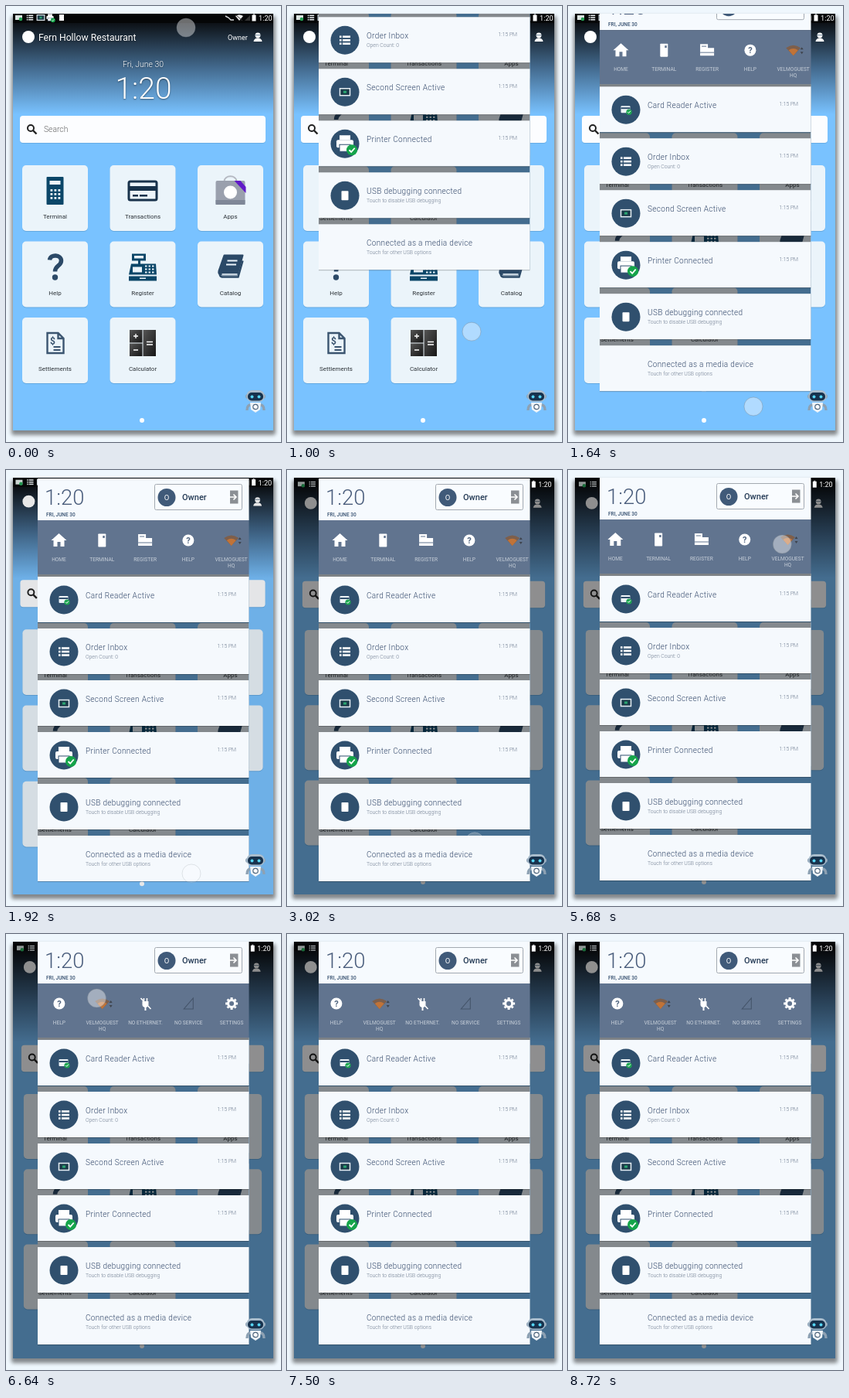
Write an HTML page that moves like this. It is 356x564 px and loops after 8740 ms.

```html
<!DOCTYPE html>
<html lang="en">
<head>
<meta charset="utf-8">
<title>Pull-down panel</title>
<style>
  html, body { margin: 0; width: 100%; height: 100%; overflow: hidden; background: #eff7fd; }
  svg { display: block; width: 356px; height: 564px; font-family: Roboto, sans-serif; }
  .shade { text-shadow: 0 1px 2px rgba(0, 0, 0, .45); }
</style>
</head>
<body>
<svg viewBox="0 0 356 564">
  <defs>
    <linearGradient id="sky" gradientUnits="userSpaceOnUse" x1="0" y1="20" x2="0" y2="140">
      <stop offset="0" stop-color="#0b0e12"/>
      <stop offset=".5" stop-color="#436a8e"/>
      <stop offset="1" stop-color="#79c2ff"/>
    </linearGradient>
    <linearGradient id="calc" x2="1" y2="1">
      <stop offset="0" stop-color="#555"/><stop offset="1" stop-color="#161616"/>
    </linearGradient>
    <filter id="blur" x="-10%" y="-10%" width="120%" height="120%"><feGaussianBlur stdDeviation="2.4"/></filter>
    <clipPath id="screenClip"><path d="M9 10H346V549H9Z"/></clipPath>
    <clipPath id="panelClip"><path d="M41 10H314.500V549H41Z"/></clipPath>
    <clipPath id="gapClip"><path d="M41 134H314.500V531H41Z"/></clipPath>
  </defs>

  <rect x="7" y="13" width="342" height="542" rx="3" opacity=".45" filter="url(#blur)"/>
  <rect x="9" y="10" width="337" height="539" fill="url(#sky)"/>
  <g clip-path="url(#screenClip)">
    <g id="homeView"><g id="home"></g></g>
    <rect id="dim" x="9" y="10" width="337" height="539"/>
  </g>
  <rect x="9" y="10" width="337" height="12" fill="#050607"/>
  <g id="status">
    <g id="statusLeft"></g>
    <g id="statusRight"></g>
  </g>

  <g clip-path="url(#panelClip)">
    <g id="panel">
      <g clip-path="url(#gapClip)">
        <rect x="41" y="134" width="274" height="397" fill="#79c2ff"/>
        <use href="#home" transform="translate(0 -12) scale(1 1.015)"/>
        <rect x="41" y="134" width="274" height="397" opacity=".44"/>
        <circle id="ghost" cx="243" cy="480" r="12" fill="#8ba0b0" stroke="#b5c2cb"/>
      </g>
      <g id="rows"></g>
      <g id="header"></g>
      <rect x="41" y="64" width="274" height="70" fill="#61748f"/>
      <rect x="41" y="134" width="274" height="3" fill="#7d8286"/>
      <g id="strip"></g>
    </g>
  </g>
  <g id="robot"></g>
  <circle id="touch" r="12" fill="#fff" fill-opacity=".42" stroke="#77808a" stroke-opacity=".4"/>
</svg>
<script>
const LOOP = 8740;
const NAVY = '#30506e';
const byId = id => document.getElementById(id);
const rect = (x, y, w, h, fill, extra = '') =>
  `<rect x="${x}" y="${y}" width="${w}" height="${h}" fill="${fill}" ${extra}/>`;
const circle = (x, y, r, fill, extra = '') => `<circle cx="${x}" cy="${y}" r="${r}" fill="${fill}" ${extra}/>`;
const path = (d, fill, extra = '') => `<path d="${d}" fill="${fill}" ${extra}/>`;
const line = (d, color, width = 1, extra = '') => path(d, 'none', `stroke="${color}" stroke-width="${width}" ${extra}`);
const text = (x, y, size, fill, label, extra = '') =>
  `<text x="${x}" y="${y}" font-size="${size}" fill="${fill}" ${extra}>${label}</text>`;
const at = (x, y, body, scale = 1) => `<g transform="translate(${x} ${y}) scale(${scale})">${body}</g>`;
const dots = (cols, rows, x, y, dx, dy, w, h, fill) => {
  let out = '';
  for (let i = 0; i < cols * rows; i++) out += rect(x + i % cols * dx, y + Math.floor(i / cols) * dy, w, h, fill);
  return out;
};
const MID = 'text-anchor="middle"', END = 'text-anchor="end"', LIGHT = 'font-weight="300"';

// Icons are drawn around their own centre.
const listIcon = color => [-4.5, 0, 4.5].map(y =>
  rect(-7, y - 1.3, 2.6, 2.6, color) + rect(-3, y - 1.3, 10, 2.6, color)).join('');
const screenIcon = rect(-6.5, -4.5, 13, 9, '#1b3b48', 'stroke="#e7eff5" stroke-width="1.5"') + rect(-2, -1.5, 4, 3, '#2aa571');
const cardIcon = rect(-6.5, -5, 12, 9, '#eef4f8', 'rx="1"') + rect(-6.5, -3, 12, 2, NAVY) +
  circle(4, 3, 3.6, '#1fa653') + line('M2.300 3L3.600 4.300L6 1.600', '#fff');
const printerIcon = rect(-7, -11, 14, 6, '#fff') + rect(-11, -5, 22, 10, '#fff', 'rx="2"') +
  rect(-7, 1, 14, 9, '#fff', `stroke="${NAVY}"`) + circle(9, 8, 7, '#15a44a') + line('M5.500 8L8.200 10.700L12.700 5.500', '#fff', 1.8);
const usbIcon = rect(-4.5, -6, 9, 12, '#fff', 'rx=".8"');
const personIcon = circle(0, -2, 3.4, '#fff') + path('M-5.500 6Q-5 1.500 0 1.500T5.500 6Z', '#fff') + rect(-3.5, -3, 7, 1.2, '#8195a6');
const registerIcon = (body, hole) => rect(-18, 12, 36, 6, body) + path('M-15 -4H17L18 10H-18Z', body) +
  rect(-14, -17, 18, 9, body) + rect(-6, -9, 3, 6, body) + rect(-11, -14.5, 12, 3.5, hole) +
  rect(-13, 0, 12, 7, hole) + dots(3, 3, 3, -2, 4.5, 4, 2.5, 2, hole) + rect(-4, 14, 8, 1.5, hole);

const tiles = [
  ['Terminal', rect(-11, -18, 22, 36, '#0b4668', 'rx="1"') + rect(-7, -13, 14, 5, '#ecf4fa') +
    dots(3, 3, -6, -2, 5, 5, 2.8, 2.8, '#ecf4fa')],
  ['Transactions', rect(-18, -12, 36, 24, '#ecf4fa', 'rx="2" stroke="#18324b" stroke-width="3"') +
    rect(-18, -6, 36, 6, '#18324b') + rect(-13, 5, 7, 2.5, '#18324b') + rect(-4, 5, 10, 2.5, '#18324b')],
  ['Apps', line('M-8 -12C-8 -21 8 -21 8 -12', '#b5b9c2', 2) + rect(-19, -13, 38, 31, '#9aa0ad', 'rx="2"') +
    rect(-19, 12, 38, 6, '#7f8797') + circle(0, 2, 8.5, '#fff') + path('M5 -13H13L20 -5V3Z', '#6019c8')],
  ['Help', line('M-7 -9C-6 -17 8 -16 8 -8C8 -1 0 -2 0 6', '#2b4967', 5.5) + circle(0, 13.5, 3.7, '#2b4967')],
  ['Register', registerIcon('#0b4668', '#ecf4fa')],
  ['Catalog', path('M-8 -15H16L9 10H-12Q-16 10 -15 5Z', '#2b4967', 'stroke="#2b4967" stroke-width="2" stroke-linejoin="round"') +
    line('M-4 -8H9M-5.500 -3H7.500', '#ecf4fa', 2) + line('M-13 7Q-15 12 -11 13H10L16 -8', '#2b4967', 2.4) + line('M-11 9.500H9', '#ecf4fa', 1.6)],
  ['Settlements', line('M-10 -13H4L11 -6V13H-10ZM4 -13V-6H11', '#3b5570', 2.4) + line('M-2 5H7M-2 9H7', '#3b5570', 1.8) +
    text(-3, 2, 12, '#3b5570', '$', MID + ' font-weight="700"')],
  ['Calculator', rect(-17, -17, 16.5, 16.5, 'url(#calc)') + rect(-17, .5, 16.5, 16.5, 'url(#calc)') + rect(.5, -17, 16.5, 34, 'url(#calc)') +
    line('M-12 -9H-6M-9 -12V-6M-12 9H-6M5 -1.500H13M5 2H13', '#fff', 1.3)]
];

byId('home').innerHTML =
  circle(29, 40, 8, '#fff') +
  text(42, 45, 12.2, '#fff', 'Fern Hollow Restaurant', 'class="shade"') +
  text(287, 44, 9, '#fff', 'Owner') + at(326, 40, personIcon) +
  text(177.5, 79, 10.5, '#fff', 'Fri, June 30', MID + ' class="shade" ' + LIGHT) +
  text(178, 120, 39, '#fff', '1:20', MID + ' class="shade" ' + LIGHT) +
  rect(18, 143, 318, 35, '#5b9fd6', 'rx="4" opacity=".6"') + rect(18, 142, 318, 35, '#fcfdff', 'rx="4"') +
  circle(32, 158, 4, 'none', 'stroke="#222" stroke-width="2"') + line('M35 161L39.500 165.500', '#222', 2.4) +
  text(49, 163, 10.3, '#666', 'Search', LIGHT) +
  tiles.map(([label, icon], i) => {
    const x = 21 + i % 3 * 113.5, y = 206 + Math.floor(i / 3) * 98.5;
    return rect(x, y + 1, 85, 85, '#5b9fd6', 'rx="5" opacity=".7"') + rect(x, y, 85, 85, '#ebf4fa', 'rx="5"') +
      at(x + 42.5, y + 33, icon) + text(x + 42.5, y + 69, 8, '#2d3338', label, MID);
  }).join('') +
  circle(176, 536, 3, '#fff');

byId('statusLeft').innerHTML =
  rect(12, 12, 9, 6, '#dbe5e2') + circle(19, 17, 2.3, '#26a255') + at(31, 15, listIcon('#e8eef0'), .6) +
  at(45, 15, screenIcon, .75) + at(57, 15, printerIcon, .42) + rect(69, 11, 6, 8, '#fff');
byId('statusRight').innerHTML =
  line('M284 13L288 15L291 18L295 18', '#d9dcde', 1.4) + path('M297 13Q302 9.500 307 13L302 19Z', '#e9e9e9') +
  line('M297 11L306 19', '#333') + path('M309 19L316 12V19Z', '#343434') +
  rect(318.5, 11.5, 5, 8, '#fff') + rect(320, 10.5, 2, 1, '#fff') + text(327, 19, 9.2, '#fff', '1:20');

const notices = [
  ['Card Reader Active', '', cardIcon, true],
  ['Order Inbox', 'Open Count: 0', listIcon('#fff'), true],
  ['Second Screen Active', '', screenIcon, true],
  ['Printer Connected', '', printerIcon, true],
  ['USB debugging connected', 'Touch to disable USB debugging', usbIcon, false],
  ['Connected as a media device', 'Touch for other USB options', '', false]
];
byId('rows').innerHTML = notices.map(([title, note, icon, timed], i) => {
  const y = 137 + i * 67;
  return rect(41, y, 274, 60, '#000', 'opacity=".25"') + rect(41, y, 274, 59, '#f5f9fd') +
    (icon && circle(75, y + 30, 18.5, NAVY) + at(75, y + 30, icon)) +
    text(103, y + 27.5, 10, '#33486a', title, 'letter-spacing=".34" ' + LIGHT) +
    text(103, y + 38.5, 6.8, '#6f7d90', note, LIGHT) +
    (timed ? text(298, y + 25, 6.8, '#66758a', '1:15 PM', END + ' ' + LIGHT) : '');
}).join('');

byId('header').innerHTML =
  rect(41, 10, 274, 54, '#f6fafe') +
  text(50, 43.5, 27.4, '#4a5d7c', '1:20', LIGHT) +
  text(52, 58.5, 6.5, '#36506f', 'FRI, JUNE 30', 'font-weight="500"') +
  rect(192.5, 17.5, 113, 33, '#f9fcff', 'rx="2" stroke="#a3a9b0"') +
  circle(208, 34.5, 11.5, '#405a79') + text(208, 38, 9.5, '#fff', 'O', MID) +
  text(228, 38, 11, '#263c57', 'Owner', 'font-weight="500"') +
  rect(290, 25.5, 10.5, 17, '#8b8f94') + line('M288 34H298M294.500 30.500L298 34L294.500 37.500', '#fff', 1.6);

const wifi = path('M-9.500 -3Q0 -10 9.500 -3L0 7Z', '#7d5f4c') + path('M-6 0Q0 -4.500 6 0L0 7Z', '#c07338') +
  path('M9 -1L11 -4L13 -1ZM9 2L11 5L13 2Z', '#3e434c');
const gear = circle(0, 0, 4.5, 'none', 'stroke="#fff" stroke-width="3"') +
  line('M0 -8V-5M0 8V5M-8 0H-5M8 0H5M-5.500 -5.500L-4 -4M5.500 5.500L4 4M-5.500 5.500L-4 4M5.500 -5.500L4 -4', '#fff', 3);
const shortcuts = [
  [['HOME'], path('M-10 0L0 -9L10 0H7V8H2V2H-2V8H-7V0Z', '#fff')],
  [['TERMINAL'], rect(-5, -8.5, 10, 17, '#fff', 'rx=".8"') + rect(1, -6, 2.5, 3, '#61748f')],
  [['REGISTER'], path('M-9 -8H1V-3H9V7H-9Z', '#fff') + line('M-7 -5H-1M-9 3H9', '#61748f', 1)],
  [['HELP'], circle(0, 0, 7.5, '#fff') + text(0, 4, 11, '#526681', '?', MID + ' font-weight="700"')],
  [['VELMOGUEST', 'HQ'], wifi],
  [['NO ETHERNET.'], path('M-4 -3H4V2Q3 5 1 5V9H-1V5Q-4 4 -4 2Z', '#fff') + line('M-2 -7V-3M2 -7V-3M-6 -7L7 7', '#fff', 1.6)],
  [['NO SERVICE'], line('M-6 7H6V-7Z', '#44546a', 1.1)],
  [['SETTINGS'], gear]
];
byId('strip').innerHTML = shortcuts.map(([labels, icon], i) => {
  const x = 68.5 + i * 55.8;
  return at(x, 90, icon) + labels.map((label, n) => text(x, 116.5 + n * 8, 6.6, '#c8d0da', label, MID)).join('');
}).join('');

byId('robot').innerHTML = at(323, 511,
  line('M-6 5Q-11 5 -11 12M6 5Q11 5 11 12', '#8da1b3', 3.4) +
  path('M-7 2H7L6 11L0 15L-6 11Z', '#eef4f8') + circle(0, 7.5, 3.2, '#fff', 'stroke="#50677d" stroke-width="1.2"') +
  rect(-13, -9, 26, 6, '#8fa4b7', 'rx="3"') + rect(-11.5, -14, 23, 15, '#a9bccc', 'rx="7"') +
  rect(-10, -11, 20, 10.5, '#17324d', 'rx="5"') + circle(-4.5, -5.5, 2, '#55d5fa') + circle(4.5, -5.5, 2, '#55d5fa'));

// Linear track through [time, value] points, held at both ends.
function track(t, points) {
  if (t <= points[0][0]) return points[0][1];
  for (let i = 1; i < points.length; i++) {
    const [t0, v0] = points[i - 1], [t1, v1] = points[i];
    if (t <= t1) return v0 + (v1 - v0) * (t - t0) / (t1 - t0);
  }
  return points[points.length - 1][1];
}

function draw(t) {
  const drop = track(t, [[150, -530], [400, -450], [1000, -190], [1640, -33], [1860, 1], [3100, 1], [3500, 0]]);
  const slide = track(t, [[5540, 0], [5680, -7], [6640, -167], [6800, -172]]);
  const depth = track(t, [[1760, 0], [2500, 1]]);
  const recede = `translate(177 282) scale(${1 - .012 * depth}) translate(-177 -282)`;

  byId('panel').setAttribute('transform', `translate(0 ${drop})`);
  byId('strip').setAttribute('transform', `translate(${slide} 0)`);
  byId('homeView').setAttribute('transform', recede);
  byId('status').setAttribute('transform', recede);
  byId('dim').setAttribute('opacity', .44 * depth);
  byId('statusLeft').setAttribute('opacity', 1 - .35 * depth);
  byId('ghost').setAttribute('opacity', track(t, [[1900, 0], [2300, .6], [3100, .6], [3500, 0]]));

  const pulling = t < 3000;
  const touch = byId('touch');
  touch.setAttribute('cx', pulling ? track(t, [[0, 233], [1000, 239], [1640, 240]]) : 284.5 + slide);
  touch.setAttribute('cy', pulling
    ? track(t, [[100, 28], [400, 150], [1000, 421], [1640, 518], [1800, 522]])
    : track(t, [[5540, 97], [5680, 96], [6640, 83]]));
  touch.setAttribute('opacity', pulling
    ? track(t, [[1780, 1], [2050, 0]])
    : track(t, [[5300, 0], [5500, 1], [6760, 1], [7060, 0]]));
}

function tick(now) {
  draw(now % LOOP);
  requestAnimationFrame(tick);
}
draw(0);
requestAnimationFrame(tick);
</script>
</body>
</html>
```
